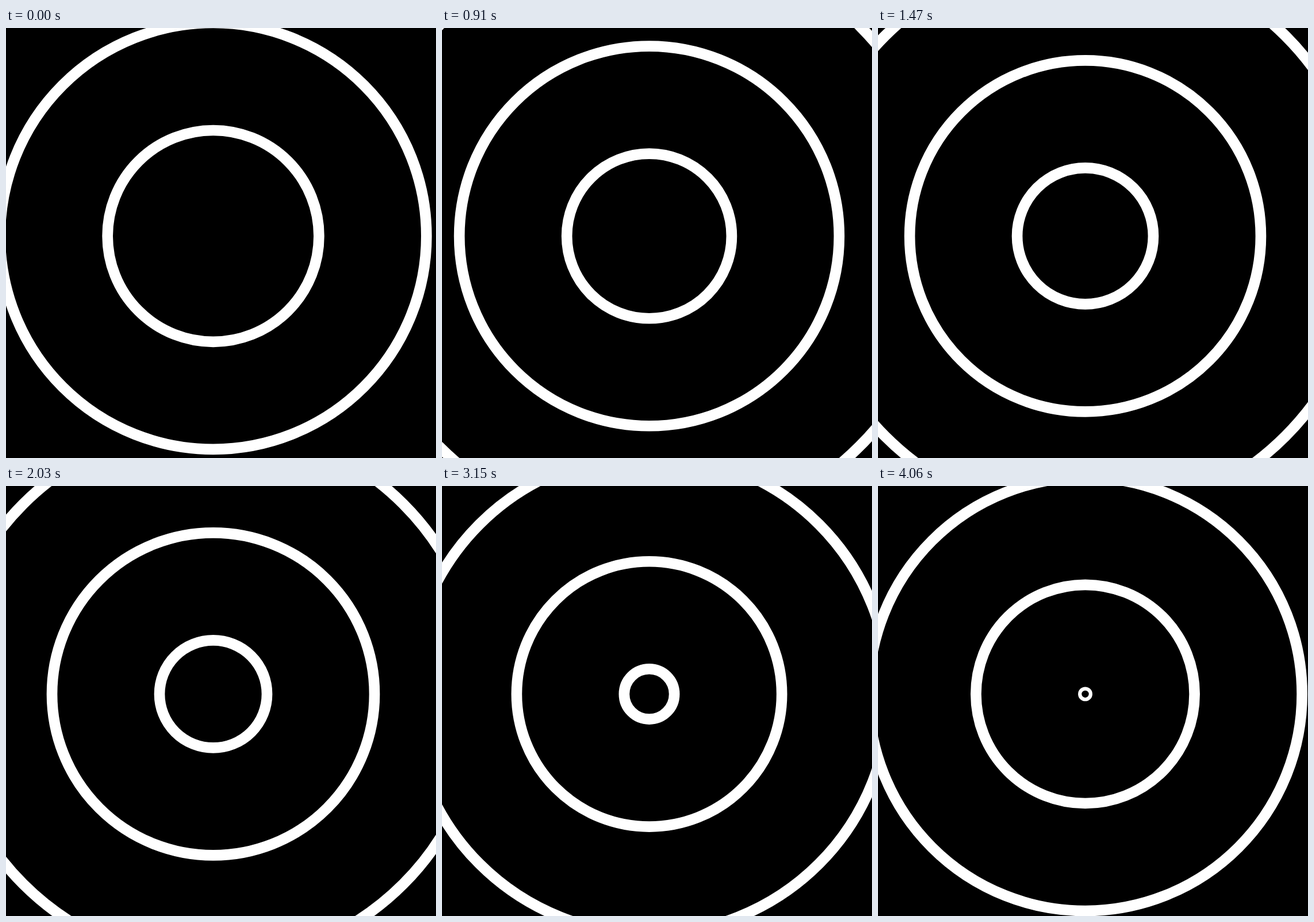
Write an HTML page that moves like this. It is 748 by 748 pixels and loops after 4.13 s.

```html
<!DOCTYPE html>
<html lang="en">
<head>
<meta charset="utf-8">
<title>Closing rings</title>
<style>
html, body { margin: 0; width: 100%; height: 100%; overflow: hidden; background: #000; }
svg { display: block; width: 100vw; height: 100vh; }
circle { fill: none; stroke: #fff; }
</style>
</head>
<body>
<svg viewBox="0 0 748 748">
  <circle cx="360.5" cy="361.9"/>
  <circle cx="360.5" cy="361.9"/>
  <circle cx="360.5" cy="361.9"/>
</svg>
<script>
const UNIT = 748 / 240;   // radius lost per step
const STEP_MS = 70;
const STEPS = 59;
const GAP = 60;           // units between rings
const rings = document.querySelectorAll('circle');

rings.forEach(ring => ring.setAttribute('stroke-width', 6 * UNIT));

function draw() {
  const step = Math.floor(performance.now() / STEP_MS) % STEPS;
  rings.forEach((ring, i) => ring.setAttribute('r', (STEPS - step + GAP * i) * UNIT));
  requestAnimationFrame(draw);
}
draw();
</script>
</body>
</html>
```
